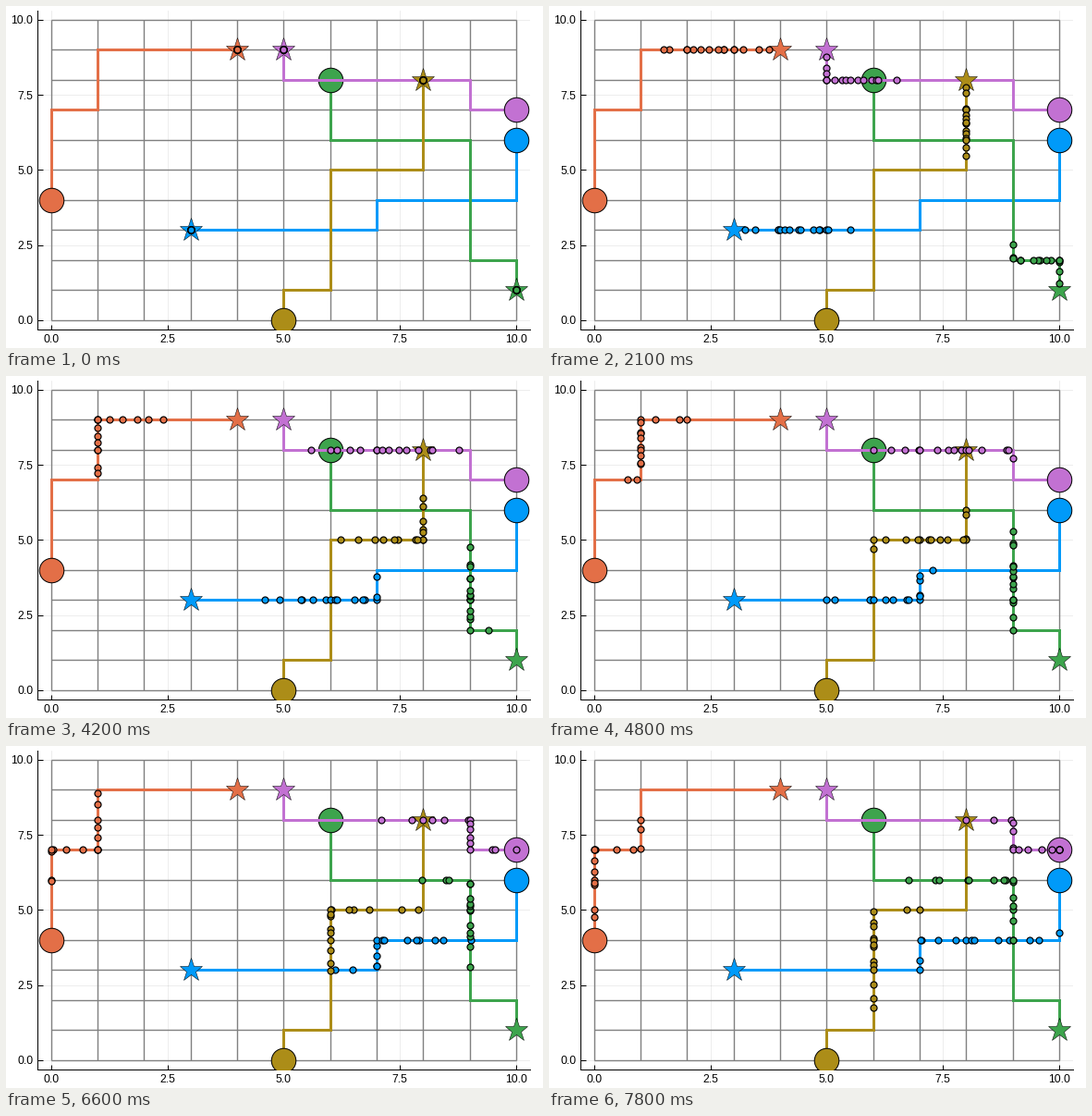
A matplotlib script for the animation above (8000 ms loop, 581 px wide and 370 px high).

```python
import numpy as np
import matplotlib.pyplot as plt
from matplotlib.animation import FuncAnimation

W, H, DPI = 581, 370, 100
PX = 72 / DPI  # points per pixel
DOTS = 15
FRAMES_PER_STEP = 3

ROUTES = {
    "#009af9": [(3, 3), (7, 3), (7, 4), (10, 4), (10, 6)],
    "#e36f47": [(4, 9), (1, 9), (1, 7), (0, 7), (0, 4)],
    "#3da44d": [(10, 1), (10, 2), (9, 2), (9, 6), (6, 6), (6, 8)],
    "#c271d2": [(5, 9), (5, 8), (9, 8), (9, 7), (10, 7)],
    "#ac8d18": [(8, 8), (8, 5), (6, 5), (6, 1), (5, 1), (5, 0)],
}

PACE = 0.25    # mean grid cells per step
DELAY = 0.35   # cells lost before the mean dot sets off
SPREAD = 0.42  # a random walk: the swarm widens with the root of time
DWELL = 1.25   # dots rest briefly at every grid node


def make_swarm(rng):
    """Seeded deviation of every dot from the mean, about -1 to 1."""
    rank = np.linspace(-1, 1, DOTS)
    rank[1:-1] += rng.uniform(-0.1, 0.1, DOTS - 2)
    return 0.6 * rank + 0.4 * rank**3


def travelled(swarm, step):
    progress = PACE * step - DELAY + SPREAD * np.sqrt(step) * swarm
    progress = np.maximum(progress, 0)
    cell = np.floor(progress)
    return cell + np.clip(0.5 + (progress - cell - 0.5) * DWELL, 0, 1)


def locate(route, dist):
    points = np.array(route, float)
    along = np.append(0, np.cumsum(np.abs(np.diff(points, axis=0)).sum(axis=1)))
    return [np.interp(dist, along, points[:, k]) for k in (0, 1)]


plt.rcParams["font.family"] = "Liberation Sans"
fig = plt.figure(figsize=(W / DPI, H / DPI), dpi=DPI, facecolor="white")
left, right, top, bottom = 33.7, 566.9, 5.1, 349.6
ax = fig.add_axes([left / W, 1 - bottom / H, (right - left) / W, (bottom - top) / H])
ax.set(xlim=(-0.3, 10.3), ylim=(-0.3, 10.3))
ticks = np.arange(0, 10.1, 2.5)
labels = [f"{t:.1f}" for t in ticks]
ax.set_xticks(ticks, labels)
ax.set_yticks(ticks, labels)
ax.tick_params(direction="in", length=5.5 * PX, width=PX, labelsize=8.7)
ax.tick_params(axis="x", pad=3.6)
ax.tick_params(axis="y", pad=3.2)
ax.spines[["top", "right"]].set_visible(False)
ax.spines[["left", "bottom"]].set_linewidth(PX)
ax.set_axisbelow(True)
ax.grid(color="black", alpha=0.1, linewidth=0.7 * PX)

for k in range(11):
    for xs, ys in (([k, k], [0, 10]), ([0, 10], [k, k])):
        ax.plot(xs, ys, color="#808080", lw=1.4 * PX, zorder=2,
                solid_capstyle="butt")

rng = np.random.default_rng(12)
swarms = [make_swarm(rng) for _ in ROUTES]
dots = []
for layer, (color, route) in enumerate(ROUTES.items(), start=3):
    ax.plot(*zip(*route), color=color, lw=3 * PX, zorder=layer,
            solid_joinstyle="miter", solid_capstyle="butt")
    ax.plot(*route[-1], "o", color=color, ms=26.5 * PX, mec="black",
            mew=PX, zorder=layer)
    ax.plot(*route[0], "*", color=color, ms=26 * PX, mec="black",
            mew=0.5 * PX, zorder=layer)
    dots += ax.plot([], [], "o", color=color, ms=7 * PX, mec="black",
                    mew=1.2 * PX, zorder=20)


def update(frame):
    step = frame // FRAMES_PER_STEP
    for dot, route, swarm in zip(dots, ROUTES.values(), swarms):
        dot.set_data(*locate(route, travelled(swarm, step)))
    return dots


anim = FuncAnimation(fig, update, frames=80, interval=100, repeat=True,
                     repeat_delay=0, blit=False)
plt.show()
```
